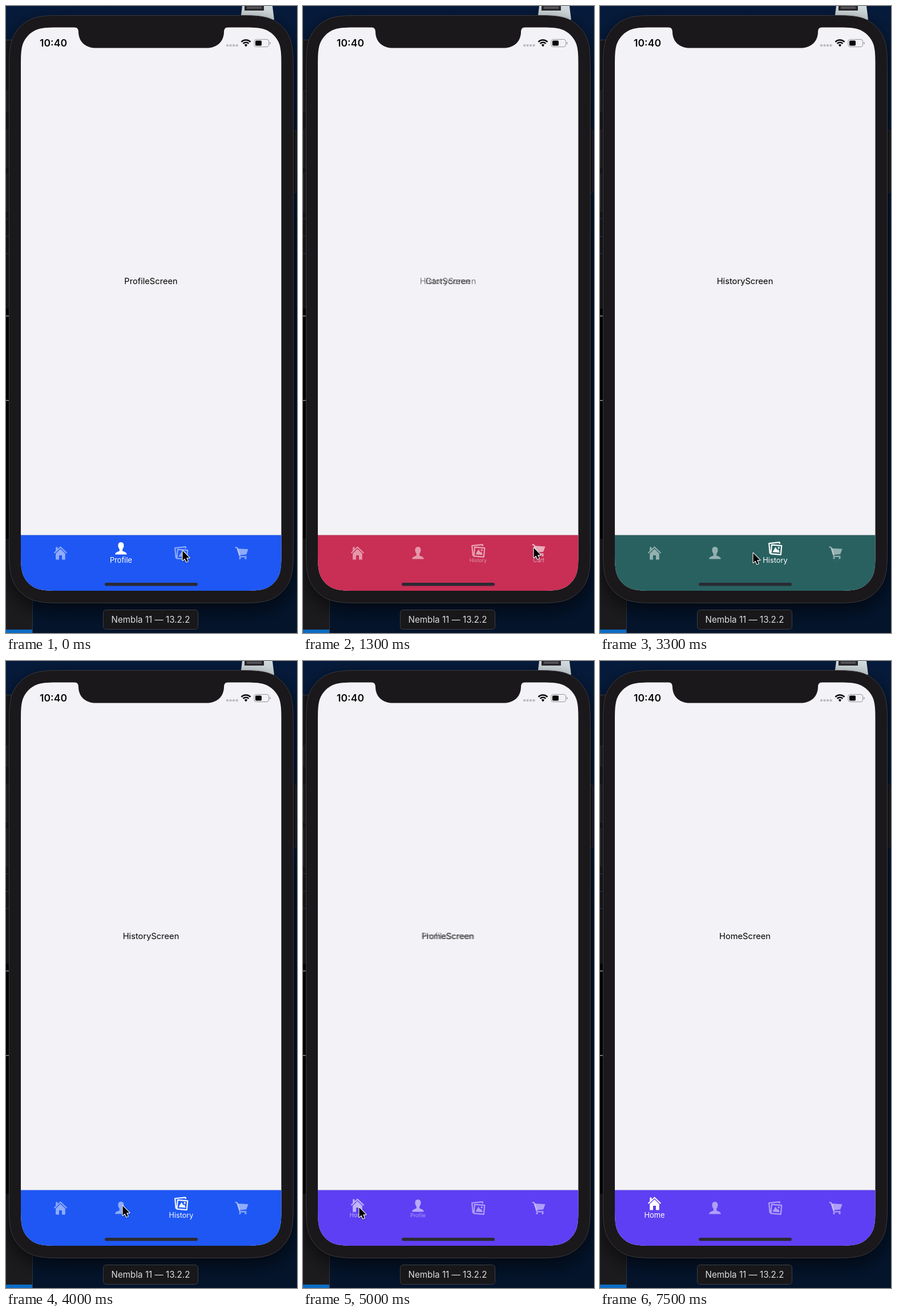
An HTML page with a canvas for the animation above (7700 ms loop, 510x1098 px).

```html
<!DOCTYPE html>
<html lang="en">
<head>
<meta charset="utf-8">
<title>Tab bar</title>
<style>
html, body { margin: 0; width: 100%; height: 100%; overflow: hidden; background: #04122a; }
canvas { display: block; }
</style>
</head>
<body>
<canvas id="stage" width="510" height="1098"></canvas>
<script>
const ctx = document.getElementById('stage').getContext('2d');
const LOOP = 7700, STEP = 100;
const FONT = 'Inter, "Liberation Sans", sans-serif';

const dot = (x, y, r) => `M${x - r} ${y}a${r} ${r} 0 1 1 ${2 * r} 0a${r} ${r} 0 1 1 ${-2 * r} 0Z`;

const tabs = [
  { name: 'Home', x: 95.5, color: '#5f3ff3',
    fill: 'M0-11.8L11.6-.8 10.2.8 0-8.9-10.2.8-11.6-.8ZM-8.2-10.6H-5V-6L-8.2-3ZM0-7.3L8.3.8V11.5H2.5V4H-2.5V11.5H-8.3V.8Z' },
  { name: 'Profile', x: 201.5, color: '#1e57f4',
    fill: 'M0-11C4-11 5.2-8 5-4.5C4.8-1.5 3.5 0 2.6 1.5V4C4 6 10 5.5 10.3 10.5H-10.3C-10 5.5-4 6-2.6 4V1.5C-3.5 0-4.8-1.5-5-4.5C-5.2-8-4-11 0-11Z' },
  { name: 'History', x: 307, color: '#296161',
    fill: 'M-4.6 6.2L.6-2.6 4 3 5.6 1.3 8 7.2Z' + dot(6.2, -1.2, 1.7),
    line: 'M-7.8 8L-9.2 8-10.8-9 7.6-10.9 8-8.2M-6.1-6.4L11.3-4.9 9.8 10.8-7.6 9.3Z' },
  { name: 'Cart', x: 413, color: '#c92e55',
    fill: 'M-7.8-8L11.6-6.7 8.2 2.6-4 3.8Z' + dot(-3, 9.3, 1.7) + dot(7, 9.3, 1.7),
    line: 'M-11.3-10L-8-9.3-3 6.4H8.5' }
];
for (const tab of tabs) {
  tab.fill = new Path2D(tab.fill);
  tab.line = new Path2D(tab.line || '');
}

// [time, tab]
const taps = [[-1000, 1], [110, 2], [1210, 3], [3080, 2], [3995, 1], [4910, 0]];

// [time, x, y] of the pointer tip
const pointer = [
  [0, 309, 953], [600, 309, 953], [1100, 404, 948], [2000, 404, 948],
  [2700, 271, 957], [3000, 268, 957], [3450, 268, 957], [3900, 204, 953],
  [4300, 204, 953], [4800, 98, 956], [6200, 98, 956], [6800, -20, 958]
];

const arrow = new Path2D('M0 0V17L3.9 13.4 6.5 19.6 9.3 18.4 6.7 12.3H12Z');
const clamp = v => Math.min(1, Math.max(0, v));
const easeOut = v => 1 - (1 - clamp(v)) ** 2;
const smooth = v => v * v * (3 - 2 * v);

// Rounded rectangle whose corners have continuous curvature.
function squircle(x, y, w, h, r) {
  const path = new Path2D();
  const corner = (cx, cy, ax, ay, bx, by) => {
    const at = (a, b) => [cx + (ax * a + bx * b) * r, cy + (ay * a + by * b) * r];
    path.lineTo(...at(1.529, 0));
    path.bezierCurveTo(...at(1.088, 0), ...at(.868, 0), ...at(.631, .075));
    path.bezierCurveTo(...at(.373, .169), ...at(.169, .373), ...at(.075, .631));
    path.bezierCurveTo(...at(0, .868), ...at(0, 1.088), ...at(0, 1.529));
  };
  corner(x, y, 0, 1, 1, 0);
  corner(x + w, y, -1, 0, 0, 1);
  corner(x + w, y + h, 0, -1, -1, 0);
  corner(x, y + h, 1, 0, 0, -1);
  path.closePath();
  return path;
}

const body = squircle(5.5, 16.5, 498, 1029, 67);
const screen = squircle(26, 37.5, 456.5, 986.5, 46);

function rect(x, y, w, h, color) {
  ctx.fillStyle = color;
  ctx.fillRect(x, y, w, h);
}

function rounded(x, y, w, h, r, fill, stroke) {
  ctx.beginPath();
  ctx.roundRect(x, y, w, h, r);
  if (fill) { ctx.fillStyle = fill; ctx.fill(); }
  if (stroke) { ctx.strokeStyle = stroke; ctx.lineWidth = 1; ctx.stroke(); }
}

function text(str, x, y, size, color, weight = 400) {
  ctx.font = `${weight} ${size}px ${FONT}`;
  ctx.textAlign = 'center';
  ctx.fillStyle = color;
  ctx.fillText(str, x, y);
}

function drawDesktop() {
  const sky = ctx.createLinearGradient(0, 0, 0, 1098);
  sky.addColorStop(0, '#061b3c');
  sky.addColorStop(0.4, '#03142e');
  sky.addColorStop(1, '#04142b');
  rect(0, 0, 510, 1098, sky);

  ctx.fillStyle = '#d3dcdf';
  ctx.fill(new Path2D('M414 0H467L470 24H411Z'));
  rect(418, 0, 34, 8, '#28272b');
  rect(422, 1, 26, 4, '#55545a');

  rect(0, 59, 46, 1039, '#1b1b1e');
  rect(0, 59, 46, 1, '#434348');
  rect(0, 372, 6, 1, '#38485c');
  rect(0, 403, 6, 1, '#38485c');
  rect(0, 433, 6, 1, '#38485c');
  rect(0, 530, 6, 403, '#020203');
  rect(0, 542, 6, 1.5, '#c4c4c8');
  rect(0, 690, 6, 1.5, '#c4c4c8');
  rect(0, 1092, 46, 6, '#0b6cc4');
  rect(46, 1020, 1, 78, '#30343c');
}

function drawPhone() {
  for (const [y, h] of [[148, 37], [216, 67], [293, 67]])
    rounded(.5, y, 8, h, 2, '#222124', '#37363a');
  rounded(499, 217, 9, 110, 2, '#1a191b', '#353439');

  ctx.save();
  ctx.shadowColor = 'rgba(0,0,0,.65)';
  ctx.shadowBlur = 32;
  ctx.shadowOffsetY = 10;
  ctx.fillStyle = '#1a181b';
  ctx.fill(body);
  ctx.restore();
  ctx.strokeStyle = '#3b3a3e';
  ctx.lineWidth = 1;
  ctx.stroke(body);
  ctx.fillStyle = '#f3f2f6';
  ctx.fill(screen);

  ctx.fillStyle = '#1a181b';
  ctx.fill(new Path2D('M119 37C125 37.5 127 40 127 46C127.5 63 140 73.5 157 73.5H352C369 73.5 381.5 63 382 46C382 40 384 37.5 390 37Z'));
}

function drawStatus() {
  text('10:40', 83, 71, 17.6, '#0a0a0a', 600);
  for (let i = 0; i < 4; i++) rounded(386 + i * 5.5, 67, 4, 4, 1.2, '#bdbcc1');

  ctx.strokeStyle = '#080808';
  ctx.lineWidth = 2.6;
  for (const r of [11, 6.7]) {
    ctx.beginPath();
    ctx.arc(420.5, 70.5, r, -Math.PI * .76, -Math.PI * .24);
    ctx.stroke();
  }
  ctx.fillStyle = '#080808';
  ctx.beginPath();
  ctx.moveTo(420.5, 71.5);
  ctx.arc(420.5, 70.5, 3.6, -Math.PI * .76, -Math.PI * .24);
  ctx.fill();

  rounded(435, 58.5, 25.5, 13, 3.5, null, '#98979c');
  rounded(437, 60.5, 11, 9, 1.7, '#080808');
  rounded(462, 63, 1.5, 4, 1, '#98979c');
}

function drawTab(tab, p) {
  ctx.save();
  ctx.translate(tab.x, 958 - 8 * p);
  ctx.globalAlpha = .5 + .5 * p ** 3;
  ctx.fillStyle = ctx.strokeStyle = '#fff';
  ctx.lineWidth = 2.2;
  ctx.lineJoin = 'round';
  ctx.fill(tab.fill);
  ctx.stroke(tab.line);
  ctx.restore();
  if (p <= 0) return;

  ctx.save();
  ctx.globalAlpha = p;
  ctx.translate(tab.x, 970.5);
  ctx.scale(.4 + .6 * p, .4 + .6 * p);
  text(tab.name, 0, 4.7, 12.9, '#fff');
  ctx.restore();
}

function drawApp(time) {
  const index = taps.findLastIndex(tap => tap[0] <= time);
  const [start, current] = taps[index];
  const previous = index ? taps[index - 1][1] : -1;
  const progress = i =>
    i === current ? easeOut((time - start) / 240) :
    i === previous ? 1 - easeOut((time - start) / 300) : 0;

  ctx.save();
  ctx.clip(screen);
  rect(26, 926, 457, 1, '#c9c8ce');
  rect(26, 926.65, 457, 98.35, tabs[current].color);
  ctx.restore();

  tabs.forEach((tab, i) => {
    const p = progress(i);
    drawTab(tab, p);
    ctx.globalAlpha = p;
    text(tab.name + 'Screen', 254, 487.3, 14.7, '#000');
    ctx.globalAlpha = 1;
  });
  rounded(173, 1010, 163, 5.5, 2.75, '#2a2a33');
}

function drawPointer(time) {
  let [, x, y] = pointer[pointer.length - 1];
  const next = pointer.findIndex(key => key[0] > time);
  if (next > 0) {
    const [t0, x0, y0] = pointer[next - 1], [t1, x1, y1] = pointer[next];
    const k = smooth((time - t0) / (t1 - t0));
    x = x0 + (x1 - x0) * k;
    y = y0 + (y1 - y0) * k;
  }
  ctx.save();
  ctx.translate(x + .5, y + 1);
  ctx.lineJoin = 'round';
  ctx.lineWidth = 2.2;
  ctx.strokeStyle = '#fff';
  ctx.shadowColor = 'rgba(0,0,0,.35)';
  ctx.shadowBlur = 3;
  ctx.shadowOffsetY = 1;
  ctx.stroke(arrow);
  ctx.shadowColor = 'transparent';
  ctx.fillStyle = '#000';
  ctx.fill(arrow);
  ctx.restore();
}

function draw(time) {
  drawDesktop();
  drawPhone();
  drawStatus();
  drawApp(time);
  rounded(170.5, 1057.5, 166, 34, 5, '#18171a', '#3c3e45');
  text('Nembla 11 — 13.2.2', 253.5, 1080, 15.2, '#dededf');
  drawPointer(time);
}

const origin = performance.now();
function frame() {
  const time = (performance.now() - origin) % LOOP;
  draw(Math.floor(time / STEP) * STEP);
  requestAnimationFrame(frame);
}
frame();
</script>
</body>
</html>
```
